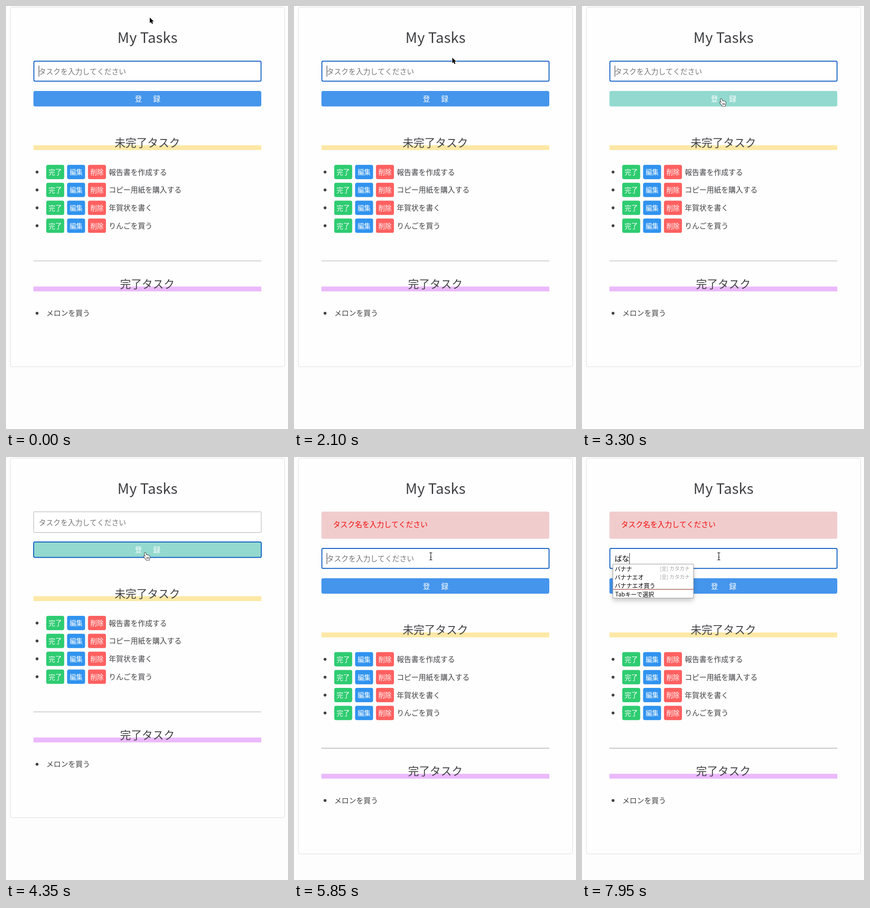
Animation, 612 px wide and 916 px high, one loop 8 s. Source, as an HTML page with a canvas:

```html
<!DOCTYPE html>
<html lang="ja">
<head>
<meta charset="utf-8">
<title>My Tasks</title>
<style>
html, body { margin: 0; width: 100%; height: 100%; overflow: hidden; background: #fdfdfd; }
canvas { display: block; width: 100vw; height: 100vh; }
</style>
</head>
<body>
<canvas id="stage" width="612" height="916"></canvas>
<script>
const ctx = document.getElementById('stage').getContext('2d');
const LOOP = 8000, EM = 15.8, ALERT_SHIFT = 78.5;
const INK = '#404144', FOCUS = '#0c5cc4', L = 59.5, W = 494.5;
const FONT = '"Noto Sans CJK JP", "Noto Sans CJK", "Noto Sans", sans-serif';

const TODO = ['報告書を作成する', 'コピー用紙を購入する', '年賀状を書く', 'りんごを買う'];
const BUTTONS = [['完了', '#2ecc71'], ['編集', '#3093ef'], ['削除', '#ff6060']];

// time, x, y, shape
const CURSOR = [
  [0, 312, 24, arrow], [1800, 319, 42, arrow], [1950, 333, 80, arrow],
  [2100, 343.5, 111, arrow], [2250, 342, 132, beam], [2400, 332, 144, beam],
  [2550, 316, 153, beam], [2700, 306, 158, beam], [3000, 303, 170, arrow],
  [3150, 298, 198, hand], [3300, 298, 200, hand], [3450, 298, 206.5, hand],
  [5250, 300, 215, beam], [5400, 297, 215, beam]
];
const CARET = [
  [0, 1], [450, 0], [900, 1], [1500, 0], [1950, 1], [2400, 0], [3000, 1],
  [3450, 0], [3900, 1], [4350, 0], [5850, 1], [6300, 0], [6900, 1]
];
const TYPED = [[0, ''], [7350, 'ｂ'], [7500, 'ば'], [7800, 'ばｎ'], [7950, 'ばな']];
const FIRST = ['バス', 'バナナ', 'バイト'];
const SECOND = ['バナナ', 'バナナエオ', 'バナナエオ買う'];

const at = (keys, t) => keys.filter(k => k[0] <= t).pop();

function text(str, x, mid, size = EM, color = INK, weight = 400, align = 'left') {
  ctx.font = `${weight} ${size}px ${FONT}`;
  ctx.textAlign = align;
  ctx.fillStyle = color;
  ctx.fillText(str, x, mid + size * 0.375);
}

function rect(x, y, w, h, color) {
  ctx.fillStyle = color;
  ctx.fillRect(x, y, w, h);
}

function box(x, y, w, h, r, fill, stroke, line = 1) {
  ctx.beginPath();
  ctx.roundRect(x, y, w, h, r);
  if (fill) { ctx.fillStyle = fill; ctx.fill(); }
  if (stroke) { ctx.strokeStyle = stroke; ctx.lineWidth = line; ctx.stroke(); }
}

function bullet(y) {
  ctx.beginPath();
  ctx.arc(67.4, y, 3.1, 0, 7);
  ctx.fillStyle = INK;
  ctx.fill();
}

function heading(str, y, color) {
  rect(L, y + 5.5, W, 10.5, color);
  text(str, 306.7, y, EM * 1.5, INK, 500, 'center');
}

function outline(path, fill, stroke, line) {
  ctx.lineJoin = 'round';
  ctx.lineWidth = line;
  ctx.strokeStyle = stroke;
  ctx.stroke(path);
  ctx.fillStyle = fill;
  ctx.fill(path);
}

function arrow() {
  outline(new Path2D('M0 1V13L2.8 10.4 4.7 14.7 6.8 13.8 5 9.6H8.8Z'), '#000', '#fff', 1.8);
}

function beam() {
  const p = new Path2D('M-3-8Q0-8 0-6.5Q0-8 3-8M0-6.5V6.5M-3 8Q0 8 0 6.5Q0 8 3 8M-1.5 2H1.5');
  for (const [color, line] of [['#fff', 2.6], ['#111', 1.2]]) {
    ctx.strokeStyle = color;
    ctx.lineWidth = line;
    ctx.stroke(p);
  }
}

function hand() {
  const p = new Path2D('M4.6 10.5L2.6 3Q2.3 1.2 3.7 1T5.6 2.4L6.9 6.6Q7.1 5.3 8.4 5.4T9.7 6.7Q10 5.8 11.1 6.1T12.1 7.3Q13.6 6.9 13.9 8.6Q14.4 11.3 13 13.5V16.8H6.2V15.6Q4.3 13.8 3.1 11.8L1 9.3Q.3 8 1.6 7.6Q2.8 7.4 4.6 10.5Z');
  outline(p, '#fff', '#111', 1.5);
  ctx.lineWidth = 0.9;
  ctx.stroke(new Path2D('M7.4 10.5V14M9.4 10.5V14M11.4 10.5V14'));
}

function popup(rows) {
  ctx.save();
  ctx.shadowColor = 'rgba(0,0,0,.22)';
  ctx.shadowBlur = 10;
  ctx.shadowOffsetY = 5;
  box(67, 232, 175, 73.5, 0, '#fff');
  ctx.restore();
  box(67, 232, 175, 73.5, 0, '#fff', '#999');
  rows.forEach((row, i) => {
    const y = 242 + i * 18;
    text(row, 71, y, 12.6, '#000');
    if (i < 2) text('[全] カタカナ', 233.7, y, 11, '#a4a4a4', 400, 'right');
  });
  rect(67.5, 286, 174, 1, '#8c1c12');
  text('Tabキーで選択', 72, 297, 12.6, '#000');
}

function form(t, dy) {
  const focused = t < 4350 || t >= 5850;
  const typed = at(TYPED, t)[1];
  if (focused) box(60.5, 119.5 + dy, 493, 43.3, 2.5, '#fff', FOCUS, 2);
  else box(60, 118.7 + dy, 494, 44.8, 1.5, '#fff', '#aaa');

  text(typed || 'タスクを入力してください', 71, 141.6 + dy, EM, typed ? '#000' : '#757575');
  if (at(CARET, t)[1]) rect(71 + typed.length * EM, Math.round(129 + dy), 1, 24, '#222');

  const hover = t >= 3150 && t < 4650;
  box(L, 184 + dy, W, 33.5, 4, hover ? '#93d9cf' : '#4495ec');
  if (t >= 4350 && t < 4650) box(60, 184 + dy, 494, 33.4, 3, null, FOCUS, 2);
  text('登', 279.4, 201.5 + dy, EM, '#fff', 500);
  text('録', 319.2, 201.5 + dy, EM, '#fff', 500);
}

function lists() {
  heading('未完了タスク', 296, '#fde8a5');
  TODO.forEach((task, i) => {
    const y = 359.6 + i * 38.75;
    bullet(y);
    BUTTONS.forEach(([label, color], j) => {
      const x = 87.3 + j * 45.3;
      box(x, y - 15.6, 39, 31, 4, color);
      text(label, x + 19.5, y + 0.5, EM * 0.9, '#fff', 500, 'center');
    });
    text(task, 223, y, EM);
  });
  rect(L, 551.5, W, 1, '#999');
  rect(L, 552.5, W, 0.8, '#eee');
  heading('完了タスク', 602, '#ebb9fc');
  bullet(665.3);
  text('メロンを買う', 87.5, 665.3, EM);
}

function draw(t) {
  const dy = t >= 4650 ? ALERT_SHIFT : 0;
  rect(0, 0, 612, 916, '#fdfdfd');
  box(9.5, 2.5, 595, 778.5 + dy, 4, '#fefefe', '#dcdcdc');
  text('My Tasks', 307, 68.5, EM * 2, INK, 500, 'center');
  if (dy) {
    box(L, 118.3, W, 58.7, 4, '#f1cccd');
    text('タスク名を入力してください', 84.8, 146, EM, '#f00a0a');
  }
  form(t, dy);
  ctx.save();
  ctx.translate(0, dy);
  lists();
  ctx.restore();
  if (t >= 7500) popup(t < 7800 ? FIRST : SECOND);

  const [, x, y, shape] = at(CURSOR, t);
  ctx.save();
  ctx.translate(x, y);
  shape();
  ctx.restore();
}

const start = performance.now();
function tick() {
  draw((performance.now() - start) % LOOP);
  requestAnimationFrame(tick);
}
tick();
</script>
</body>
</html>
```
